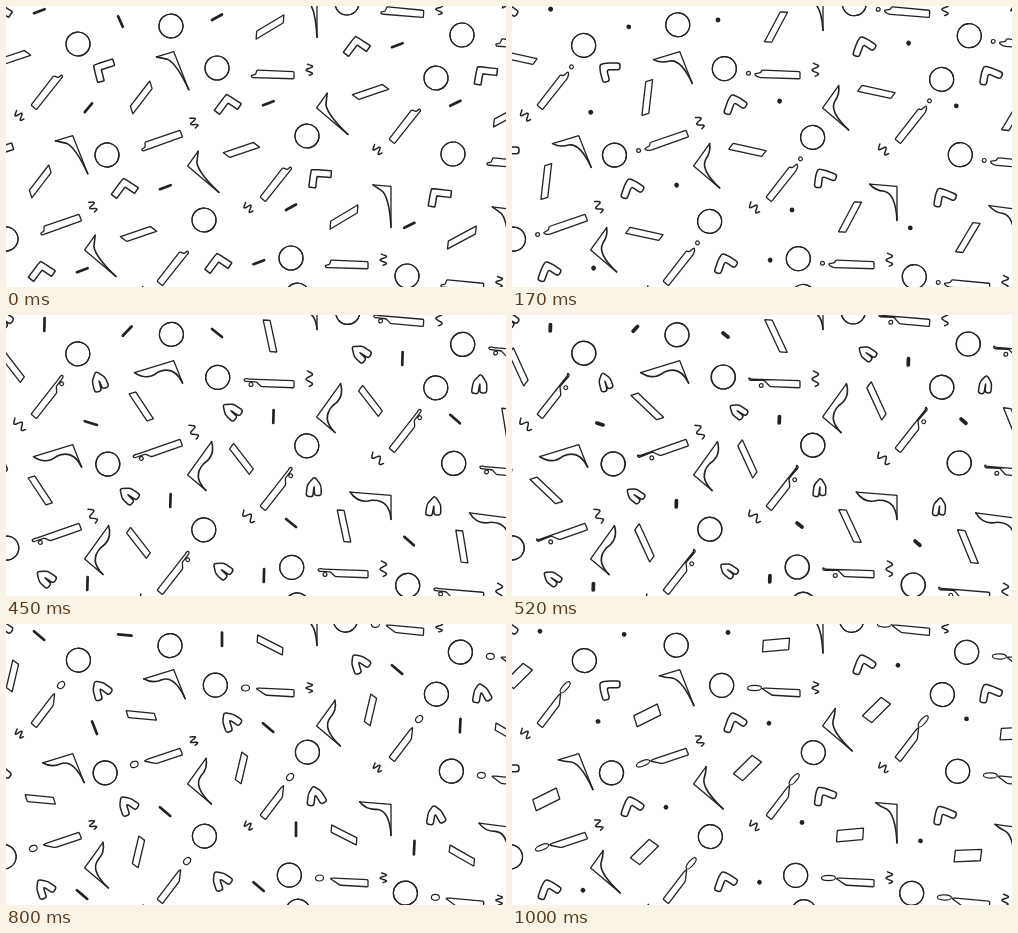
An HTML page with a canvas that plays this animation: 500 by 281 pixels, repeating every 1.03 s.

```html
<!DOCTYPE html>
<html lang="en">
<head>
<meta charset="utf-8">
<title>Doodle pattern</title>
<style>
  html, body { margin: 0; width: 100%; height: 100%; overflow: hidden; background: #fff; }
  canvas { display: block; width: 500px; height: 281px; }
</style>
</head>
<body>
<canvas id="stage" width="500" height="281"></canvas>
<script>
const ctx = document.getElementById('stage').getContext('2d');
const INK = '#222';
const LOOP = 1030;
const STEPS = [0, 100, 170, 240, 310, 380, 450, 520, 660, 730, 800, 900, 1000];
const CYCLE = 7; // poses in one loop; every step advances half a pose
const TAU = Math.PI * 2;
const RAD = Math.PI / 180;

// The whole motif repeats at these places, turned and sometimes mirrored
const GROUPS = [
  { turn: 0, at: [[211, 62], [285, 252]] },
  { turn: 2.7, at: [[401, 270], [341, -3], [456, 29], [447, 148]] },
  { turn: -21.5, at: [[101, 149], [0, 233]] },
  { turn: -85, at: [[165, 20]] },
  { turn: 130.3, mirror: true, at: [[72, 38], [430, 72], [301, 130], [198, 214], [115, 297], [291.5, 289]] }
];
const TRIANGLE = [[5, -53.5], [-5, -48], [5, -40], [5, -53.5]];
const BAND_TURN = [-31, -62, -74, -102, -128, -153, -185];

const mix = (a, b, k) => a + (b - a) * k;
const mixPoint = (p, q, k) => [mix(p[0], q[0], k), mix(p[1], q[1], k)];
const clamp = v => Math.max(0, Math.min(1, v));
const pulse = (pose, peak) => clamp(1 - Math.abs(pose - peak));
const polar = (deg, r) => [r * Math.cos(deg * RAD), r * Math.sin(deg * RAD)];
const add = (...pts) => pts.reduce((a, b) => [a[0] + b[0], a[1] + b[1]]);

const fold = pose => Math.sin(Math.PI * pose / CYCLE) ** 2;
const swing = pose => Math.sin(Math.PI * pose / 6.4) ** 1.2;

// Point u along a list, where whole numbers are its entries
function along(list, u, blend) {
  const i = Math.min(list.length - 2, Math.floor(u));
  return blend(list[i], list[i + 1], u - i);
}

function toward(p, q, r) {
  const len = Math.hypot(q[0] - p[0], q[1] - p[1]) || 1;
  return mixPoint(p, q, Math.min(.5, r / len));
}

function stroke(width = 1.3) {
  ctx.lineWidth = width;
  ctx.stroke();
}

// Closed outline with softened corners
function shape(pts, r, width) {
  const n = pts.length;
  ctx.beginPath();
  pts.forEach((p, i) => {
    ctx.lineTo(...toward(p, pts[(i + n - 1) % n], r));
    ctx.quadraticCurveTo(...p, ...toward(p, pts[(i + 1) % n], r));
  });
  ctx.closePath();
  stroke(width);
}

function oval(x, y, rx, ry) {
  ctx.beginPath();
  ctx.ellipse(x, y, rx, ry, 0, 0, TAU);
  stroke(1.2);
}

function at(x, y, deg, draw) {
  ctx.save();
  ctx.translate(x, y);
  ctx.rotate(deg * RAD);
  draw();
  ctx.restore();
}

// Keep the part of a polygon where side * p[axis] <= limit
function clip(pts, axis, side, limit) {
  const out = [];
  pts.forEach((p, i) => {
    const q = pts[(i + 1) % pts.length];
    const a = limit - side * p[axis], b = limit - side * q[axis];
    if (a >= 0) out.push(p);
    if (a * b < 0) out.push(mixPoint(p, q, a / (a - b)));
  });
  return out;
}

function drawRing(pose) {
  const d = .85 * Math.sin(TAU * pose / CYCLE);
  oval(2 * d, d, 12, 12);
  oval(2 * d + .9 * pulse(pose, 4), d, 12, 12);
}

// The nose stretches, twists off and leaves as a drop
function drawStick(pose) {
  const right = [[77, 3.7], [77, 10.8]];
  if (pose < 4) {
    const pull = pose * pose;
    const tip = [34 - 2.4 * pose, 7.5 - 1.7 * pose];
    const top = [40 - pull, 2];
    shape([
      tip, [top[0] - 1.5, tip[1] - 1], top, ...right,
      [36 + .9 * pull, 9.5], [35 + pull / 2, 9.5 - pull / 2], add(tip, [1, 1.9])
    ], 1);
    const slide = Math.max(0, pose - 2);
    const r = 1.9 * clamp(pose);
    if (r) oval(25.5 + 8.5 * slide, 5.2 + 2.2 * slide, r, r);
  } else {
    const twist = pulse(pose, 4);
    const tip = [39 + 7 * twist, 2.5 + 2 * twist];
    shape([tip, add(tip, [3, -.5 - twist]), ...right, [49, 9.2]], 1);
    const rx = pose < 5 ? 4 + 6 * (5 - pose) : 4 + 3 * (pose - 5);
    oval(24.5 + rx, 2 + .7 * twist, rx, 3 - .14 * (rx - 4));
  }
}

function drawSquiggle(pose) {
  const height = 11 + 4.5 * swing(pose) - 4 * pulse(pose, 5);
  ctx.beginPath();
  for (let k = 0; k <= 1; k += 1 / 24) {
    ctx.lineTo(92.3 + 3.2 * Math.sin(TAU * 1.6 * k - .6), 1.7 + height * (k - .5));
  }
  stroke(1.5);
}

// A turning strip cut off by a fixed box
function drawBand(pose) {
  const tilt = 4;
  const deg = along(BAND_TURN, pose, mix) - tilt;
  const half = 3.3 + 2.4 * pulse(pose, 6);
  const end = polar(deg, 40), side = polar(deg + 90, half);
  const flip = p => [-p[0], -p[1]];
  let pts = [add(end, side), add(end, flip(side)), add(flip(end), flip(side)), add(flip(end), side)];
  for (const s of [-1, 1]) pts = clip(clip(pts, 0, s, 13), 1, s, 15.5);
  at(53, -41, tilt, () => shape(pts, .3));
}

function drawBlade(pose) {
  const s = swing(pose);
  const arm = 18 + 23 * s, spike = 41 - 17 * s;
  at(100, -71.7, 0, () => {
    const left = [-arm, -.08 * arm];
    ctx.beginPath();
    ctx.moveTo(...left);
    ctx.lineTo(0, 0);
    ctx.lineTo(0, spike);
    stroke();
    ctx.beginPath();
    ctx.moveTo(...left);
    ctx.quadraticCurveTo(-.8 * arm, 1 + 8 * s, -.47 * arm, 5);
    ctx.quadraticCurveTo(-1.5, 4 + 9 * (1 - s) ** 2, 0, spike);
    stroke(1.6);
  });
}

// Two legs around an inner corner; the right one folds down
function drawElbow(pose) {
  const f = fold(pose);
  const left = 97, right = 4 + 88 * f;
  const w = 6.8 - 1.8 * pulse(pose, 4);
  const inner = [3 - 3 * f, -1.5];
  const a = polar(left, 11.5), b = polar(right, 14 - 4 * f);
  const na = polar(left + 90, w), nb = polar(right - 90, w);
  const apex = polar((left + right) / 2 + 180, 1.3 * w);
  const pts = [add(a, na), na, apex, nb, add(b, nb), b, [0, 0], a].map(p => add(p, inner));
  at(23, -80, 0, () => shape(pts, .6 + 2 * clamp(pose), 1.5));
}

// A short line crawls round the triangle, resting as a dot
function drawDash(pose) {
  const head = 1 + clamp(pose - 2) + clamp(pose - 4);
  const tail = clamp(pose) + clamp(pose - 3) + clamp(pose - 5);
  ctx.beginPath();
  ctx.moveTo(...along(TRIANGLE, tail, mixPoint));
  ctx.lineTo(...add(along(TRIANGLE, head, mixPoint), [.01, 0]));
  stroke(2.7 + 2.1 * (1 - head + tail));
}

const PARTS = [drawRing, drawStick, drawSquiggle, drawBand, drawBlade, drawElbow, drawDash];

function frame() {
  const t = performance.now() % LOOP;
  const pose = (STEPS.filter(s => s <= t).length - 1) / 2;
  ctx.fillStyle = '#fff';
  ctx.fillRect(0, 0, 500, 281);
  ctx.strokeStyle = INK;
  ctx.lineCap = ctx.lineJoin = 'round';
  for (const { turn, mirror, at: places } of GROUPS) {
    for (const [x, y] of places) {
      at(x, y, turn, () => {
        if (mirror) ctx.scale(1, -1);
        PARTS.forEach(draw => draw(pose));
      });
    }
  }
  requestAnimationFrame(frame);
}
frame();
</script>
</body>
</html>
```
